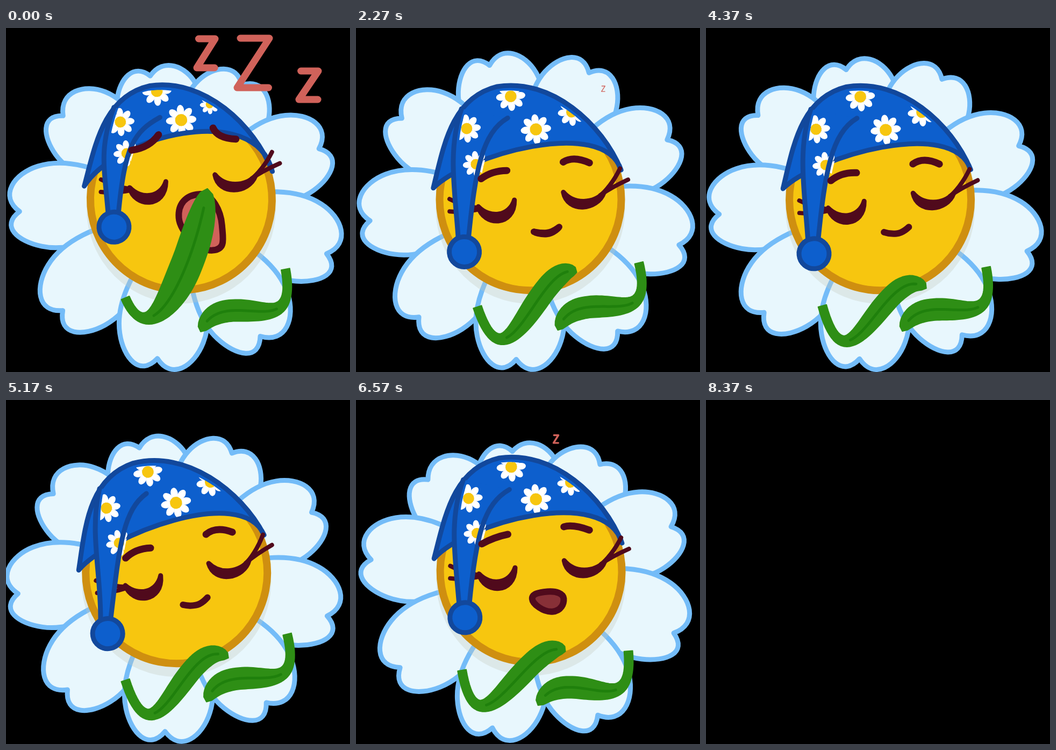
An HTML page with a canvas that plays this animation: 640x640 px, repeating every 8410 ms.

```html
<!DOCTYPE html>
<html lang="en">
<head>
<meta charset="utf-8">
<title>Sleepy daisy</title>
<style>
html, body { margin: 0; width: 100%; height: 100%; overflow: hidden; background: #000; }
canvas { display: block; width: 100vw; height: 100vh; }
</style>
</head>
<body>
<canvas id="stage" width="640" height="640"></canvas>
<script>
const ctx = document.getElementById('stage').getContext('2d');
const LOOP = 8410, BLANK = 8370, RAD = Math.PI / 180;
const C = {
  petal: '#e8f7fd', rim: '#74bcf8', face: '#f7c60f', ring: '#cf8f10',
  cap: '#0d5fcd', seam: '#12489c', ink: '#500a1c', rose: '#d0625a',
  leaf: '#2e8e15', vein: '#1f800c'
};

const mix = (a, b, k) => a + (b - a) * k;
const mixPt = (a, b, k) => a.map((v, i) => mix(v, b[i], k));
const clamp = v => Math.max(0, Math.min(1, v));
const ease = (t, a, b) => { const k = clamp((t - a) / (b - a)); return k * k * (3 - 2 * k); };
// Fades out early in the loop, comes back late
const dip = (t, out0, out1, in0, in1) => 1 - ease(t, out0, out1) + ease(t, in0, in1);
const wave = (t, cycles, peak) => Math.cos(2 * Math.PI * cycles * (t - peak) / LOOP);

function pose(t) {
  const tilt = -5.5 - 5.4 * wave(t, 2, 1200);
  const spin = -2.5 - 6 * wave(t, 2, 1100) - 4 * wave(t, 1, LOOP / 4);
  const yawn = dip(t, 900, 2500, 5900, 7900);
  return {
    tilt, spin, yawn,
    headX: 332 + 1.4 * tilt, headY: 317 - 0.4 * tilt,
    x: 322 + 0.75 * tilt, y: 319,
    top: 0.82 + 0.058 * wave(t, 1, 2700),
    gather: Math.max(0, spin),
    ballX: -116 + 2.9 * tilt, ballY: 88 - 46 * yawn,
    mouth: dip(t, 900, 2400, 5400, 8300),
    lift: dip(t, 1200, 2600, 6200, 7800)
  };
}

function draw(path, fill, stroke, width) {
  if (fill) { ctx.fillStyle = fill; ctx.fill(path); }
  if (stroke) {
    ctx.strokeStyle = stroke;
    ctx.lineWidth = width;
    ctx.stroke(path);
  }
}
function disc(x, y, r, fill, stroke, width) {
  const p = new Path2D();
  p.arc(x, y, r, 0, 7);
  draw(p, fill, stroke, width);
}
const line = (d, width) => draw(new Path2D(d), null, C.ink, width);

function petal(i, p) {
  const turn = i * 40 - 40;
  let a = (-100 + 40 * i + 1.5 * Math.cos(turn * RAD) + p.spin) * RAD;
  a -= p.gather * RAD * Math.cos(a) ** 3;
  const s = Math.sin(a);
  // Upper petals lean back, lower ones come closer
  const k = s < 0 ? 1 - (1 - p.top) * (-s) ** 1.4 : 1 + 0.014 * s;
  const wide = 1.02 + 0.05 * Math.max(0, s);
  const cleft = 9 * Math.sin(turn * RAD);
  ctx.save();
  ctx.translate(p.x, p.y);
  ctx.rotate(a);
  const shape = new Path2D();
  const to = (x1, y1, x2, y2, x, y) =>
    shape.bezierCurveTo(x1 * k, y1 * wide, x2 * k, y2 * wide, x * k, y * wide);
  shape.moveTo(80 * k, -24);
  to(140, -66, 205, -86, 256, -73);
  to(300, -62, 332, -28 + cleft * 0.6, 294, cleft);
  to(332, 28 + cleft * 0.6, 300, 62, 256, 73);
  to(205, 86, 140, 66, 80, 24);
  shape.closePath();
  draw(shape, C.petal, C.rim, 9);
  ctx.restore();
}

// Leaf along a cubic: thin stem, broad blade, rounded tip
function leaf(b, swell) {
  const left = [], right = [], mid = [];
  for (let i = 0; i <= 48; i++) {
    const s = i / 48, r = 1 - s;
    const at = o => r * r * r * b[o] + 3 * r * r * s * b[2 + o] + 3 * r * s * s * b[4 + o] + s * s * s * b[6 + o];
    const vel = o => r * r * (b[2 + o] - b[o]) + 2 * r * s * (b[4 + o] - b[2 + o]) + s * s * (b[6 + o] - b[4 + o]);
    const x = at(0), y = at(1), dx = vel(0), dy = vel(1), len = Math.hypot(dx, dy) || 1;
    const w = (8 + swell * ease(s, 0.1, 0.65)) * Math.sqrt(1 - clamp((s - 0.74) / 0.26) ** 2);
    left.push([x - dy / len * w, y + dx / len * w]);
    right.unshift([x + dy / len * w, y - dx / len * w]);
    if (s > 0.3 && s < 0.92) mid.push([x, y]);
  }
  const body = new Path2D(), vein = new Path2D();
  left.concat(right).forEach(q => body.lineTo(...q));
  body.closePath();
  mid.forEach(q => vein.lineTo(...q));
  draw(body, C.leaf, C.leaf, 2);
  draw(vein, null, C.vein, 5);
}

// Arms hang on the flower, so they turn with it
const REST_ARM = [202, 130, 229, 280, 84, 150, 44, 246];
const HAND_DOWN = [-104, 196, -56, 384, 14, 107, 90, 167];
const HAND_UP = [-96, 183, -46, 300, 34, 120, 57, -20];
function arms(p) {
  ctx.save();
  ctx.translate(p.x - 1, p.y);
  ctx.rotate((p.spin + 2) * RAD);
  leaf(REST_ARM, 12);
  leaf(mixPt(HAND_DOWN, HAND_UP, p.lift), mix(11, 21, p.lift));
  ctx.restore();
}

function daisy(x, y, r) {
  ctx.save();
  ctx.translate(x, y);
  ctx.fillStyle = '#fff';
  for (let i = 0; i < 8; i++) {
    ctx.rotate(Math.PI / 4);
    ctx.beginPath();
    ctx.ellipse(r * 0.65, 0, r * 0.36, r * 0.24, 0, 0, 7);
    ctx.fill();
  }
  disc(0, 0, r * 0.4, C.face);
  ctx.restore();
}

// Runs a drawing inside a shape whose edge is moved inward
function inside(shape, dx, dy, paint) {
  ctx.save();
  ctx.translate(dx, dy);
  ctx.clip(shape);
  ctx.translate(-dx, -dy);
  paint();
  ctx.restore();
}

function cap(p) {
  const u = p.yawn, bx = p.ballX, by = p.ballY, brim = mix(-116, -150, u);
  const hat = new Path2D(`M-178 -38 C-152 -112 -130 -202 -42 -215 C60 -222 146 -128 173 -39 ` +
    `C150 ${brim - 25} -114 ${brim + 25} -178 -38Z`);
  draw(hat, C.cap);
  inside(hat, -4, 9, () => {
    daisy(mix(-18, -30, u), mix(-194, -204, u), 27);
    daisy(mix(23, 11, u), mix(-128, -147, u), 28);
    daisy(mix(93, 66, u), mix(-154, -172, u), mix(26, 18, u));
  });
  draw(hat, null, C.seam, 9);

  const tail = new Path2D(`M-28 -155 C-78 -132 -97 ${by - 150} ${bx + 10} ${by - 24} ` +
    `L${bx - 9} ${by - 24} C-138 ${by - 110} -146 -105 -112 -180`);
  draw(tail, C.cap);
  inside(tail, 9, 0, () => {
    daisy(mix(-106, -102, u), mix(-142, -152, u), 26);
    daisy(-95, mix(-74, -93, u), 24);
  });
  draw(tail, null, C.seam, 9);
  disc(bx, by, 28, C.cap, C.seam, 9);
}

function withEyes(u, paint) {
  ctx.save();
  ctx.translate(4 * u, -35 * u);
  paint();
  ctx.restore();
}
function eyes() {
  draw(new Path2D('M-98 6 C-92 44 -34 50 -30 0 C-42 29 -78 31 -98 6Z'), C.ink, C.ink, 9);
  draw(new Path2D('M62 -6 C66 34 122 34 137 2 C116 20 80 20 62 -6Z'), C.ink, C.ink, 9);
  line('M-96 9 Q-127 2 -150 -13', 8);
  line('M-96 11 Q-127 15 -152 10', 8);
}
function lashes() {
  line('M122 13 Q152 -8 171 -40', 8);
  line('M130 6 Q150 -6 184 -18', 8);
}

function brows(u) {
  const left = mixPt([-88, -44, -67, -58, -39, -54], [-85, -98, -52, -100, -33, -123], u);
  const right = mixPt([67, -60, 88, -72, 116, -55], [69, -128, 76, -108, 110, -104], u);
  for (const [x0, y0, x1, y1, x2, y2] of [left, right])
    line(`M${x0} ${y0} Q${x1} ${y1} ${x2} ${y2}`, 13);
}

function mouth(m) {
  const L = mixPt([1, 61], [-7, 34], m), R = mixPt([48, 56], [72, 54], m);
  const T = mixPt([24, 66], [34, -7], m), B = mixPt([24, 66], [51, 99], m);
  const hx = 12 + 13 * m, hy = 26 * m;
  const p = new Path2D();
  p.moveTo(...L);
  p.bezierCurveTo(L[0], L[1] - hy, T[0] - hx, T[1], ...T);
  p.bezierCurveTo(T[0] + hx, T[1], R[0], R[1] - hy, ...R);
  p.bezierCurveTo(R[0], R[1] + hy, B[0] + hx, B[1], ...B);
  p.bezierCurveTo(B[0] - hx, B[1], L[0], L[1] + hy, ...L);
  draw(p, C.ink);
  ctx.globalAlpha = clamp((m - 0.25) * 4);
  draw(p, C.rose);
  ctx.globalAlpha = 1;
  draw(p, null, C.ink, 12);
}

function zed(x, y, w, h, k) {
  if (k < 0.02) return;
  ctx.save();
  ctx.translate(x, y);
  ctx.scale(k, k);
  draw(new Path2D(`M${-w * 0.8} ${-h} H${w} L${-w} -8 H${w * 0.95}`), null, C.rose, 13);
  ctx.restore();
}

function render(t) {
  ctx.clearRect(0, 0, 640, 640);
  if (t >= BLANK) return;
  ctx.lineCap = ctx.lineJoin = 'round';
  const p = pose(t);

  // From the topmost petal down both sides
  for (let j = 0; j < 9; j++) petal(j % 2 ? 9 - (j + 1) / 2 : j / 2, p);
  ctx.globalCompositeOperation = 'source-atop';
  disc(p.headX, p.headY + 18, 176, 'rgba(196,203,190,.32)');
  ctx.globalCompositeOperation = 'source-over';

  ctx.save();
  ctx.translate(p.headX, p.headY);
  ctx.rotate(p.tilt * RAD);
  disc(0, 0, 169, C.face, C.ring, 14);
  withEyes(p.yawn, eyes);
  mouth(p.mouth);
  cap(p);
  withEyes(p.yawn, lashes);
  brows(p.yawn);
  ctx.restore();

  arms(p);
  zed(372, 82, 17, 62, dip(t, 300, 1650, 6300, 7100));
  zed(460, 119, 30, 100, dip(t, 1000, 2600, 6750, 7500));
  zed(563, 141, 18, 61, dip(t, 950, 2300, 6950, 7700));
}

const start = performance.now();
function tick() {
  render((performance.now() - start) % LOOP);
  requestAnimationFrame(tick);
}
tick();
</script>
</body>
</html>
```
